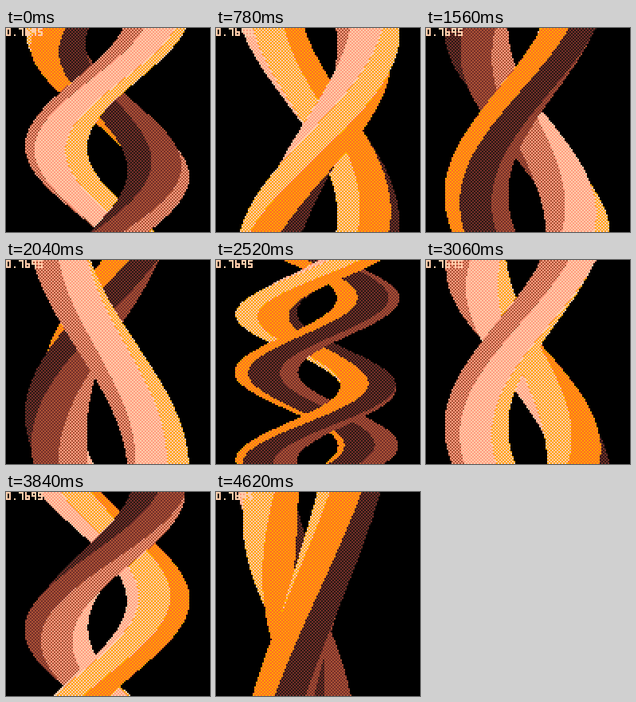
Write an HTML page with a canvas that moves like this. It is 256 px wide and 256 px high and loops after 4650 ms.

```html
<!DOCTYPE html>
<html lang="en">
<head>
<meta charset="utf-8">
<title>Twisted strands</title>
<style>
  html, body { margin: 0; width: 100%; height: 100%; overflow: hidden; background: #000; }
  canvas { display: block; width: 256px; height: 256px; image-rendering: pixelated; }
</style>
</head>
<body>
<canvas id="stage" width="128" height="128" aria-label="0.7695"></canvas>
<script>
const ctx = document.getElementById('stage').getContext('2d');
const TAU = Math.PI * 2;
const SIZE = 128, CENTER = 64, ORBIT = 32, RADIUS = 20, SIDES = 6;
const STEP = 30, STEPS = 155;

// Each face dithers two neighbours of this ramp.
const ramp = ['#291814', '#742f29', '#ab5236', '#ff9d81', '#ffccaa', '#ffa300', '#ff6c24'];
const fills = ramp.slice(1).map((color, i) => checker(ramp[i], color));

// Angles in turns: orbit offset, face offset, spin per step, twist per row.
const strands = [
  { orbit: -0.214, face: 0.875, spin: 0.014, twist: 1 / 360 },
  { orbit: 0.186, face: 0.472, spin: 0.03, twist: 0.00085 },
];

// 3x5 glyphs, one octal digit per row.
const glyphs = { 0: '75557', '.': '00002', 7: '71111', 6: '44757', 9: '75711', 5: '74717' };

function checker(a, b) {
  const tile = document.createElement('canvas');
  tile.width = tile.height = 2;
  const c = tile.getContext('2d');
  c.fillStyle = a;
  c.fillRect(0, 0, 2, 2);
  c.fillStyle = b;
  c.fillRect(1, 0, 1, 1);
  c.fillRect(0, 1, 1, 1);
  return ctx.createPattern(tile, 'repeat');
}

function drawSlice(strand, angle, y, step) {
  const x = CENTER + ORBIT * Math.sin(angle * TAU);
  const turn = strand.face - strand.spin * step + strand.twist * y;
  const corner = i => Math.floor(x + RADIUS * Math.sin(((i - 0.5) / SIDES - turn) * TAU));
  for (let i = 0; i < SIDES; i++) {
    const left = corner(i), right = corner(i + 1);
    if (left >= right) continue;
    ctx.fillStyle = fills[i];
    ctx.fillRect(left, y, right - left, 1);
  }
}

function print(text) {
  ctx.fillStyle = '#ffccaa';
  [...text].forEach((char, i) => [...glyphs[char]].forEach((bits, y) => {
    for (let x = 0; x < 3; x++) {
      if (bits & (4 >> x)) ctx.fillRect(i * 4 + x, y, 1, 1);
    }
  }));
}

function draw(step) {
  const phase = step / 50;
  const winding = (Math.sin((phase - 0.033) * TAU) - 0.5) / 120;
  ctx.fillStyle = '#000';
  ctx.fillRect(0, 0, SIZE, SIZE);
  for (let y = 0; y < SIZE; y++) {
    strands
      .map(strand => ({ strand, angle: strand.orbit - phase + winding * y }))
      .sort((a, b) => Math.cos(a.angle * TAU) - Math.cos(b.angle * TAU))
      .forEach(({ strand, angle }) => drawSlice(strand, angle, y, step));
  }
  print('0.7695');
}

function tick() {
  draw(Math.floor(performance.now() / STEP) % STEPS);
  requestAnimationFrame(tick);
}
tick();
</script>
</body>
</html>
```
